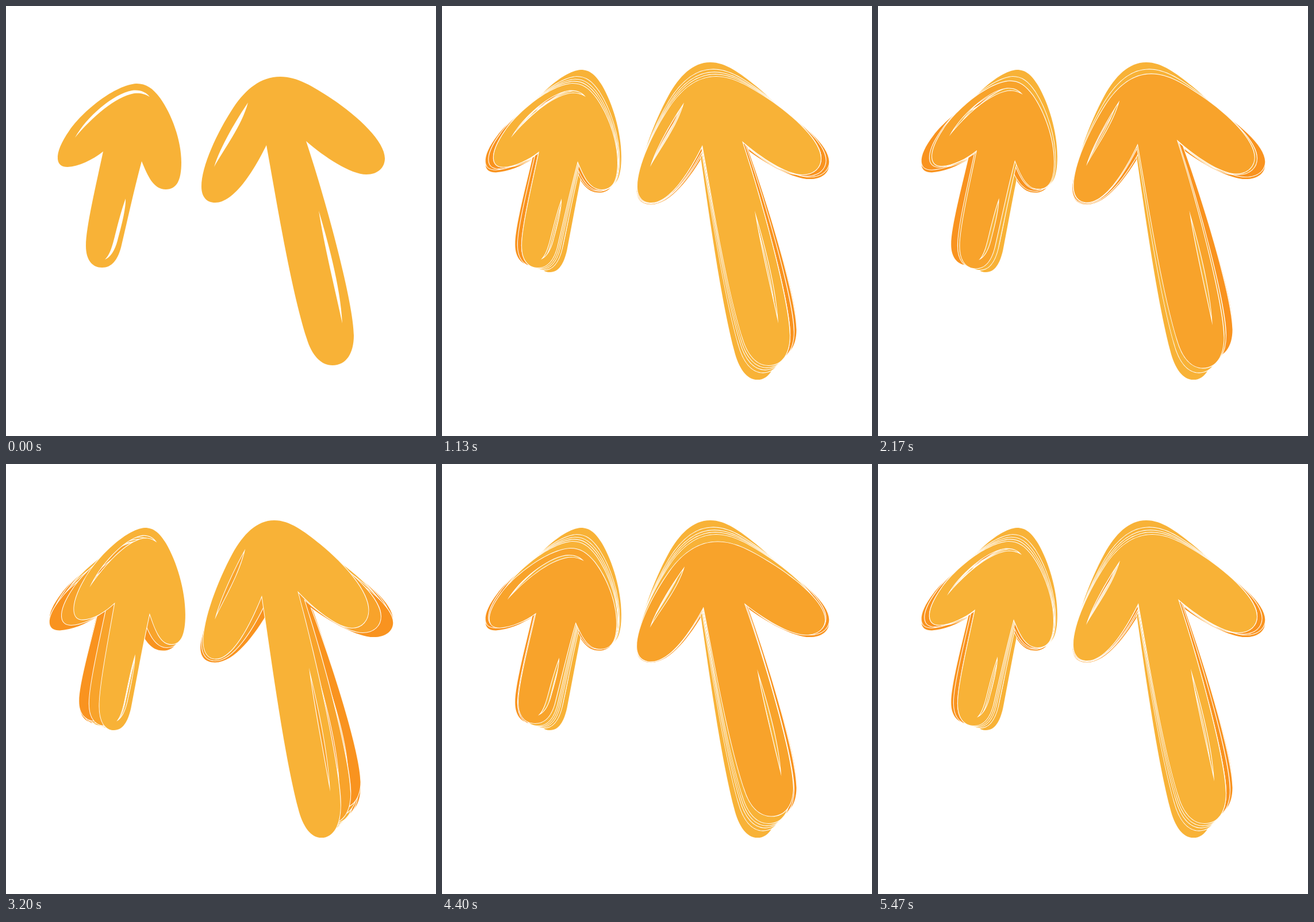
An HTML page with a canvas that plays this animation: 748 px wide and 748 px high, repeating every 5730 ms.

```html
<!DOCTYPE html>
<html lang="en">
<head>
<meta charset="utf-8">
<title>Bouncing arrows</title>
<style>
html, body { margin: 0; width: 100%; height: 100%; overflow: hidden; background: #fff; }
canvas { display: block; width: 100%; height: 100%; }
</style>
</head>
<body>
<canvas id="stage" width="748" height="748"></canvas>
<script>
const SIZE = 748, MID = SIZE / 2, LOOP = 5730;
const YELLOW = '#f8b237', AMBER = '#f8a32b', ORANGE = '#f9931f';

// Both arrows at rest; the slivers are holes that let earlier prints show through.
const arrows = new Path2D([
  'M227 135C190 137 133 183 110 217C96 237 89 254 90 266C91 276 97 280 107 280C127 279 150 268 169 253',
  'C157 310 139 385 139 417C139 443 151 455 167 455C184 455 194 442 200 420C211 374 222 322 236 270',
  'C247 297 257 319 278 319C297 319 305 303 305 272C305 233 288 188 268 160C255 143 244 135 227 135Z',
  'M120 229C140 193 186 153 219 147C233 145 244 150 250 158C240 152 232 151 223 152C190 158 150 193 120 229Z',
  'M208 335C209 352 200 386 194 408C189 426 182 437 172 441C184 430 187 407 196 374C200 359 204 346 208 335Z',
  'M477 123C443 123 417 145 396 176C367 220 340 279 340 314C340 332 349 342 364 342C396 342 430 289 453 242',
  'C470 335 495 490 523 578C532 608 548 625 568 625C592 625 605 604 605 573C605 520 560 350 522 235',
  'C554 263 600 293 627 293C647 293 659 281 659 265C659 236 614 193 566 161C534 140 507 123 477 123Z',
  'M421 168C403 194 372 246 362 280C379 249 410 209 421 168Z',
  'M544 356C558 403 582 487 585 552C574 500 553 415 544 356Z'
].join(''));

// Squash and stretch about the centre: x scale, y scale, colour.
const REST = [1, 1, YELLOW];
const bigSwing = [
  [1.025, 0.95, AMBER], [1.05, 0.9, ORANGE], [0.975, 1, AMBER], [0.9, 1.1, YELLOW],
  [0.975, 1.025, AMBER], [1.05, 0.95, ORANGE], [1, 1, AMBER], [0.95, 1.05, YELLOW]
];
const smallSwing = [
  [0.985, 1.018, AMBER], [1.03, 0.97, ORANGE], [1, 1, AMBER],
  [0.97, 1.03, YELLOW], [0.985, 1.015, YELLOW], REST
];
const bigOffsets = [0, 100, 170, 230, 330, 400, 470];
const smallOffsets = [0, 100, 170, 230, 330, 400];

// Start of the big swing, its last step, start of the small swing.
const bounces = [[100, 670, 730], [1530, 2100, 2170], [2970, 3530, 3600], [4400, 4970, 5070]];

const steps = [{ at: 0, pose: REST }];
for (const [start, last, again] of bounces) {
  const times = [...bigOffsets.map(o => start + o), last, ...smallOffsets.map(o => again + o)];
  [...bigSwing, ...smallSwing].forEach((pose, i) => steps.push({ at: times[i], pose }));
}

const ctx = document.getElementById('stage').getContext('2d');
ctx.lineWidth = 2.2;
ctx.lineJoin = 'round';
ctx.strokeStyle = '#fffdf8';

function print([sx, sy, colour]) {
  ctx.setTransform(sx, 0, 0, sy, MID * (1 - sx), MID * (1 - sy));
  ctx.stroke(arrows);
  ctx.fillStyle = colour;
  ctx.fill(arrows, 'evenodd');
}

// Each step is printed over the ones before it; the sheet is wiped once per loop.
function render(count) {
  ctx.setTransform(1, 0, 0, 1, 0, 0);
  ctx.fillStyle = '#fff';
  ctx.fillRect(0, 0, SIZE, SIZE);
  for (let i = 0; i < count; i++) print(steps[i].pose);
}

const begin = performance.now();
let shown = 0;
function tick() {
  const t = (performance.now() - begin) % LOOP;
  const count = steps.filter(s => s.at <= t).length;
  if (count !== shown) render(shown = count);
  requestAnimationFrame(tick);
}
tick();
</script>
</body>
</html>
```
